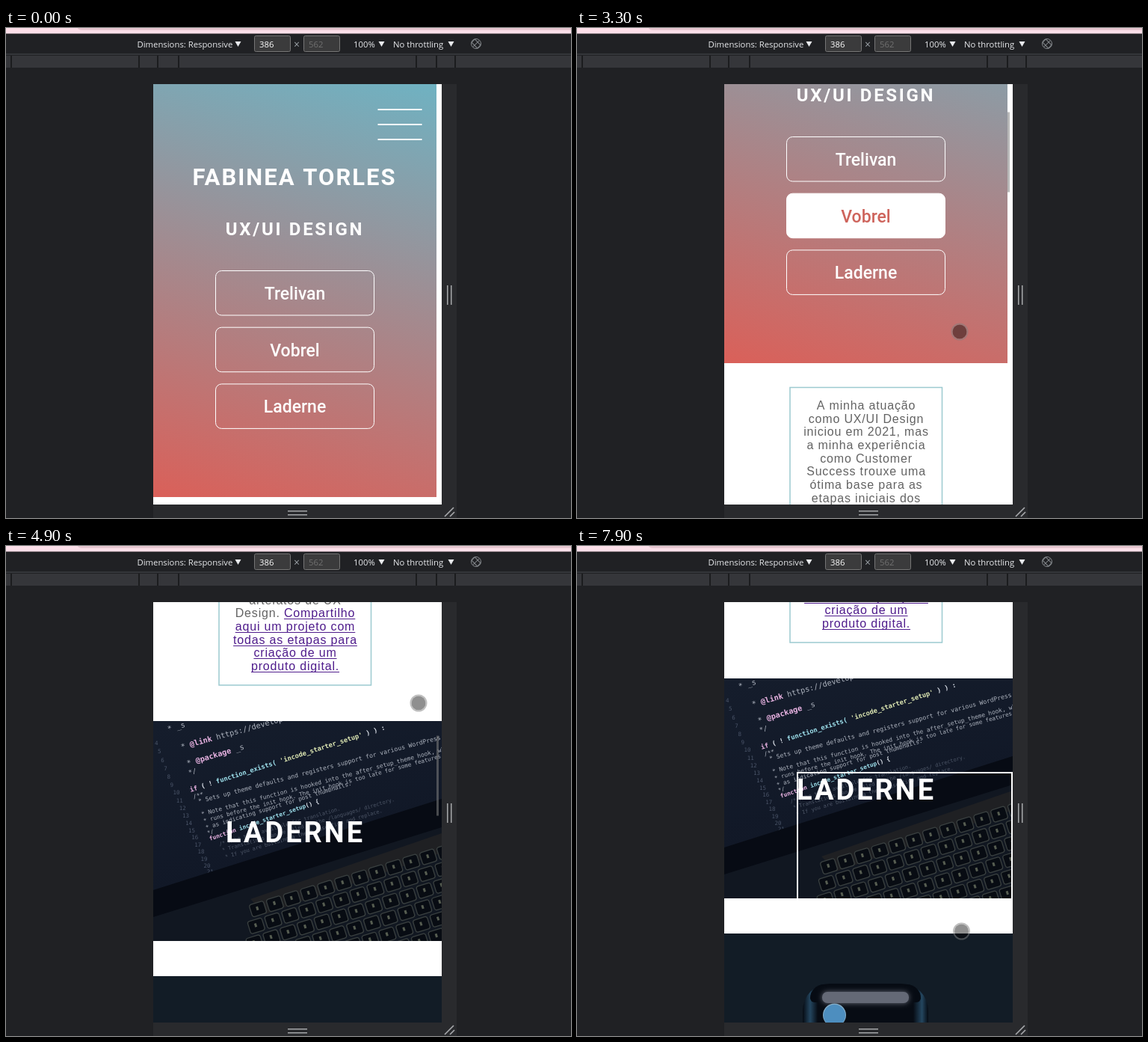
These frames come from a looping animation (756 by 655 pixels, 8000 ms). An HTML page with a canvas:

```html
<!DOCTYPE html>
<html lang="pt">
<head>
<meta charset="utf-8">
<title>Portfolio preview</title>
<style>
html, body { margin: 0; width: 100%; height: 100%; overflow: hidden; background: #202124; }
canvas { display: block; }
</style>
</head>
<body>
<canvas id="stage" width="756" height="655"></canvas>
<script>
const ctx = document.getElementById('stage').getContext('2d');
const LOOP = 8000, TICK = 100;
const VIEW = { x: 197, y: 75, w: 386, h: 562 };
const PHOTO = { x: 197, y: 1146, w: 386, h: 294 };
const UI = '"Open Sans", "Noto Sans", sans-serif';
const HEAD = 'Roboto, "Open Sans", sans-serif';
const BODY = '"Liberation Sans", Arial, sans-serif';
const MONO = '"DejaVu Sans Mono", monospace';

// [time, scroll offset]
const SCROLL = [[1700, 0], [1800, 30], [1900, 80], [2000, 124], [2100, 160], [2200, 179],
  [3300, 179], [3400, 290], [3500, 425], [3600, 535], [3700, 607], [3800, 607],
  [3900, 655], [4000, 688], [4100, 704], [4600, 704], [4700, 765], [4800, 845],
  [4900, 912], [5000, 912], [5100, 950], [5200, 969]];
// [time, x, y]
const TOUCH = [[600, 388, 184], [700, 578, 332], [1000, 578, 332], [1100, 530, 372],
  [1200, 495, 408], [1300, 477, 412], [1700, 477, 412], [1800, 477, 382], [1900, 477, 332],
  [2000, 477.5, 288], [2100, 477, 252], [2200, 477, 233], [2500, 477, 233], [2900, 512, 406],
  [3300, 512, 406], [3600, 538, 250], [3800, 538, 250], [4000, 538, 219], [4200, 538, 219],
  [4500, 552, 418], [4600, 552, 418], [4900, 552, 210], [5400, 552, 210], [5800, 402, 415],
  [6300, 402, 415], [6500, 428, 333], [7000, 428, 333], [7200, 500, 37], [7400, 583, 330],
  [7600, 530, 642], [7700, 514, 520], [7800, 514, 520], [7900, 514.5, 515]];
const HOVER = [[1900, 0], [2000, 0.2], [2100, 0.6], [2200, 0.92], [2400, 1]];
const BAR_SHOWN = [[1800, 2500], [3300, 4200], [4700, 5400]];

const ABOUT = ['A minha atuação', 'como UX/UI Design', 'iniciou em 2021, mas',
  'a minha experiência', 'como Customer', 'Success trouxe uma', 'ótima base para as',
  'etapas iniciais dos', 'projetos, como', 'pesquisas', 'quantitativas e',
  'qualitativas, mapear', 'a dor e necessidade', 'do usuário, criar',
  'personas, jornada do', 'usuário, workshop,', 'entre outros', 'artefatos de UX',
  'Design. |Compartilho', '|aqui um projeto com', '|todas as etapas para',
  '|criação de um', '|produto digital.'];

const PINK = '#eab4e4', WHITE = '#dfe4ec', CYAN = '#9fe2ee', LEMON = '#dfe9b4', GREY = '#adb3be', DIM = '#4c5566';
// x, y, size, degrees, then colour and text pairs
const CODE = [
  [20, 14, 10, 15, GREY, '* _s'],
  [38, 38, 10.2, 15.5, GREY, '* ', PINK, '@link ', GREY, 'https://developer.'],
  [46, 60, 10.2, 16.5, GREY, '* ', PINK, '@package', GREY, ' _s'],
  [48, 72, 9, 16, GREY, '*/'],
  [50, 95, 8.75, 17.8, PINK, 'if ', WHITE, '( ! ', CYAN, 'function_exists( ', LEMON, "'incode_starter_setup'", WHITE, ' ) ) :'],
  [54, 104, 8, 16, GREY, '/**'],
  [61, 110, 8.2, 14.8, GREY, '* Sets up theme defaults and registers support for various WordPress'],
  [65, 127, 7.9, 15, GREY, '* Note that this function is hooked into the after_setup_theme hook, which'],
  [68, 136, 7.6, 15.3, GREY, '* runs before the init hook. The init hook is too late for some features'],
  [71, 145, 7.7, 17, GREY, '* as indicating support for post thumbnails.'],
  [73, 152, 7.4, 16, GREY, '*/'],
  [76, 160, 7.8, 19, PINK, 'function ', CYAN, 'incode_starter_setup', WHITE, '() {'],
  [89, 167, 7, 16.5, DIM, '/* Make theme available for translation.'],
  [93, 175, 7, 16.5, DIM, '* Translations can be filed in the /languages/ directory.'],
  [97, 184, 7, 16.5, DIM, '* If you are building a theme, use find and replace.'],
  [103, 200, 7.2, 16.5, WHITE, 'load_theme_textdomain', GREY, '( ', LEMON, "'incode'", GREY, ', get_template_directory() ', LEMON, "'/languages'"],
  [108, 214, 7.2, 16.5, GREY, 'add_theme_support( ', LEMON, "'automatic-feed-links'", GREY, ' );']
];

function track(keys, t) {
  if (t <= keys[0][0]) return keys[0].slice(1);
  for (let i = 1; i < keys.length; i++) {
    const a = keys[i - 1], b = keys[i];
    if (t <= b[0]) {
      const k = (t - a[0]) / (b[0] - a[0]);
      return a.slice(1).map((v, j) => v + (b[j + 1] - v) * k);
    }
  }
  return keys[keys.length - 1].slice(1);
}

function rect(x, y, w, h, color) {
  ctx.fillStyle = color;
  ctx.fillRect(x, y, w, h);
}

function poly(points, color) {
  ctx.beginPath();
  points.forEach(p => ctx.lineTo(p[0], p[1]));
  ctx.closePath();
  ctx.fillStyle = color;
  ctx.fill();
}

function line(x1, y1, x2, y2, color, width) {
  ctx.beginPath();
  ctx.moveTo(x1, y1);
  ctx.lineTo(x2, y2);
  ctx.strokeStyle = color;
  ctx.lineWidth = width;
  ctx.stroke();
}

function round(x, y, w, h, r) {
  ctx.beginPath();
  ctx.roundRect(x, y, w, h, r);
}

function disc(x, y, r, color) {
  ctx.beginPath();
  ctx.arc(x, y, r, 0, 7);
  ctx.fillStyle = color;
  ctx.fill();
}

function text(str, x, y, font, color, align = 'left', spacing = 0) {
  ctx.font = font;
  ctx.letterSpacing = spacing + 'px';
  ctx.textAlign = align;
  ctx.fillStyle = color;
  ctx.fillText(str, x, y);
}

function drawTools() {
  rect(0, 0, 756, 655, '#202124');
  rect(0, 0, 756, 7.5, '#fcdfe9');
  round(95, -12, 700, 15, 6);
  ctx.fillStyle = '#e7c7d1';
  ctx.fill();

  const font = '11.3px ' + UI, ink = '#e8eaed';
  text('Dimensions: Responsive', 175.5, 25.5, font, ink);
  text('100%', 465, 25.5, font, ink);
  text('No throttling', 518, 25.5, font, ink);
  for (const x of [306.5, 498.5, 591.5]) poly([[x, 18], [x + 8, 18], [x + 4, 25]], ink);
  for (const x of [332.5, 398.5]) {
    round(x, 10.5, 48, 21, 2);
    ctx.fillStyle = '#3b3b3c';
    ctx.fill();
    ctx.strokeStyle = '#757575';
    ctx.lineWidth = 1;
    ctx.stroke();
  }
  text('386', 339, 25.5, font, '#ffffff');
  text('×', 385, 27, '14px ' + UI, '#9aa0a6');
  text('562', 405, 25.5, font, '#707070');

  ctx.save();
  ctx.translate(629, 21);
  ctx.beginPath();
  ctx.arc(0, 0, 6.5, 0, 7);
  ctx.strokeStyle = '#85898d';
  ctx.lineWidth = 1;
  ctx.stroke();
  ctx.rotate(-Math.PI / 4);
  round(-3, -5.5, 6, 11, 1);
  ctx.stroke();
  ctx.rotate(Math.PI / 2);
  line(0, -6, 0, 6, '#85898d', 1);
  ctx.restore();

  rect(0, 34.5, 756, 1, '#494c50');
  rect(0, 37, 756, 16, '#35363a');
  for (const x of [7, 178, 203, 231, 549, 576, 601]) rect(x - 1, 37, 2, 16, '#1b1c1e');

  rect(583, 75, 20, 580, '#292a2d');
  rect(197, 637, 406, 18, '#292a2d');
  const grip = '#a5a7aa';
  for (const d of [0, 5]) {
    rect(590 + d, 344, 1.5, 26, grip);
    rect(377, 645 + d, 26, 1.5, grip);
  }
  line(587, 653, 599, 641, grip, 1.7);
  line(594, 653, 600, 647, grip, 1.7);
}

function drawHero(hover) {
  const w = 379, h = 552, cx = 197 + w / 2, cy = 75 + h / 2, a = 15 * Math.PI / 180;
  const half = (w * Math.sin(a) + h * Math.cos(a)) / 2;
  const dx = half * Math.sin(a), dy = half * Math.cos(a);
  const fill = ctx.createLinearGradient(cx - dx, cy + dy, cx + dx, cy - dy);
  fill.addColorStop(0, '#da6059');
  fill.addColorStop(1, '#6fb2c2');
  rect(197, 75, w, h, fill);
  for (const y of [108, 128, 148]) rect(497.5, y, 59, 2, '#fff');
  text('FABINEA TORLES', 386, 210, 'bold 31px ' + HEAD, '#fff', 'center', 2);
  text('UX/UI DESIGN', 386.5, 277, 'bold 24px ' + HEAD, '#fff', 'center', 2.7);

  ['Trelivan', 'Vobrel', 'Laderne'].forEach((label, i) => {
    const y = 324.5 + i * 75.7, on = i === 1 ? hover : 0;
    round(280.5, y, 212, 59.5, 8);
    ctx.fillStyle = `rgba(255,255,255,${on})`;
    ctx.fill();
    ctx.strokeStyle = '#fff';
    ctx.lineWidth = 1;
    ctx.stroke();
    const ink = [255 - 49 * on, 255 - 155 * on, 255 - 163 * on].map(Math.round);
    text(label, 386.5, y + 38.5, '500 23px ' + HEAD, `rgb(${ink})`, 'center');
  });
}

function drawAbout() {
  ctx.strokeStyle = '#9ccad0';
  ctx.lineWidth = 1.5;
  ctx.strokeRect(285, 659.5, 203.5, 438.5);
  const font = '16px ' + BODY, gap = 0.82, purple = '#4f1c8c';
  ABOUT.forEach((row, i) => {
    const y = 689 + i * 17.68;
    const [plain, link] = row.split('|');
    ctx.font = font;
    ctx.letterSpacing = gap + 'px';
    const pw = ctx.measureText(plain).width;
    const lw = link ? ctx.measureText(link).width : 0;
    const x = 387 - (pw + lw) / 2;
    text(plain, x, y, font, '#636363', 'left', gap);
    if (link) {
      text(link, x + pw, y, font, purple, 'left', gap);
      rect(x + pw, Math.round(y + 2), lw, 1, purple);
    }
  });
}

function drawCode([x, y, size, deg, ...parts]) {
  ctx.save();
  ctx.translate(x, y);
  ctx.rotate(-deg * Math.PI / 180);
  let at = 0;
  for (let i = 0; i < parts.length; i += 2) {
    const weight = parts[i] === GREY || parts[i] === DIM ? '' : 'bold ';
    text(parts[i + 1], at, 0, weight + size + 'px ' + MONO, parts[i]);
    at += ctx.measureText(parts[i + 1]).width;
  }
  ctx.restore();
}

function drawKeys() {
  ctx.save();
  ctx.translate(128, 246);
  ctx.transform(0.95, -0.29, 0.3, 0.95, 0, 0);
  for (let r = 0; r < 6; r++) {
    for (let i = 0; i < 14; i++) {
      const x = i * 24 - r * 9, y = r * 21;
      round(x, y, 20, 17, 3);
      ctx.fillStyle = '#080c13';
      ctx.fill();
      ctx.strokeStyle = '#3a4040';
      ctx.lineWidth = 1.3;
      ctx.stroke();
      rect(x + 8, y + 5, 3, 5, 'rgba(205,215,175,0.4)');
    }
  }
  ctx.restore();
}

function drawPhoto() {
  const { x, y, w, h } = PHOTO;
  ctx.save();
  ctx.beginPath();
  ctx.rect(x, y, w, h);
  ctx.clip();
  ctx.translate(x, y);
  const glow = ctx.createLinearGradient(0, 0, 60, 220);
  glow.addColorStop(0, '#151d2c');
  glow.addColorStop(1, '#111827');
  rect(0, 0, w, h, glow);
  for (let k = 0; k < 19; k++) {
    text(String(k + 4), 2 + 4.1 * k, 32 + 11.5 * k - 0.08 * k * k, 7.5 + 'px ' + MONO, '#4a5468');
  }
  CODE.forEach(drawCode);
  poly([[0, 226], [w, 104], [w, h], [0, h]], '#111721');
  poly([[0, 226], [w, 104], [w, 142], [0, 262]], '#070b14');
  poly([[130, 238], [w, 150], [w, 176], [150, 258]], '#1f2023');
  drawKeys();
  ctx.restore();
  text('LADERNE', 294, 1308, 'bold 38px ' + HEAD, '#fff', 'left', 3);
}

function drawPhone() {
  rect(197, 1487, 386, 300, '#121c26');
  const body = ctx.createLinearGradient(302, 0, 470, 0);
  [[0, '#060b13'], [0.06, '#24465f'], [0.12, '#070c14'], [0.88, '#070c14'], [0.95, '#24465f'], [1, '#060b13']]
    .forEach(([p, c]) => body.addColorStop(p, c));
  round(302, 1554, 168, 220, [36, 36, 0, 0]);
  ctx.fillStyle = body;
  ctx.fill();
  round(312, 1555, 148, 24, [26, 26, 8, 8]);
  ctx.fillStyle = '#060b13';
  ctx.fill();
  ctx.save();
  ctx.shadowColor = '#666b78';
  ctx.shadowBlur = 7;
  round(328, 1565, 116, 15, 7);
  ctx.fillStyle = '#646976';
  ctx.fill();
  ctx.restore();
  disc(344.5, 1596, 15.5, '#86aec8');
  disc(344.5, 1596.5, 14.5, '#4d8ebf');
}

function drawPage(t, scroll) {
  ctx.save();
  ctx.beginPath();
  ctx.rect(VIEW.x, VIEW.y, VIEW.w, VIEW.h);
  ctx.clip();
  rect(VIEW.x, VIEW.y, VIEW.w, VIEW.h, '#fff');
  ctx.save();
  ctx.translate(0, -scroll);
  drawHero(track(HOVER, t)[0]);
  drawAbout();
  drawPhoto();
  drawPhone();
  if (t >= 6800 && t < 7000) {
    const tap = 'rgba(51,181,229,0.4)';
    rect(PHOTO.x, PHOTO.y, PHOTO.w, PHOTO.h, tap);
    rect(294, PHOTO.y + PHOTO.h, 250, 32, tap);
  }
  if (t >= 7000) {
    ctx.strokeStyle = '#fff';
    ctx.lineWidth = 2;
    ctx.strokeRect(295, 1272, 287, 201);
  }
  ctx.restore();
  for (const [from, to] of BAR_SHOWN) {
    if (t < from) continue;
    const alpha = 0.55 * Math.max(0, Math.min(1, 1 - (t - to) / 400));
    rect(576, 78 + scroll * 0.1925, 3, 107, `rgba(128,128,128,${alpha})`);
  }
  ctx.restore();
}

function drawTouch(t) {
  if (t < 600) return;
  const [x, y] = track(TOUCH, t);
  disc(x, y, 9.5, 'rgba(0,0,0,0.44)');
  ctx.beginPath();
  ctx.arc(x, y, 10.5, 0, 7);
  ctx.strokeStyle = 'rgba(128,128,128,0.5)';
  ctx.lineWidth = 2;
  ctx.stroke();
}

function frame() {
  const t = Math.floor(performance.now() % LOOP / TICK) * TICK;
  drawTools();
  drawPage(t, Math.round(track(SCROLL, t)[0]));
  drawTouch(t);
  requestAnimationFrame(frame);
}
frame();
</script>
</body>
</html>
```
